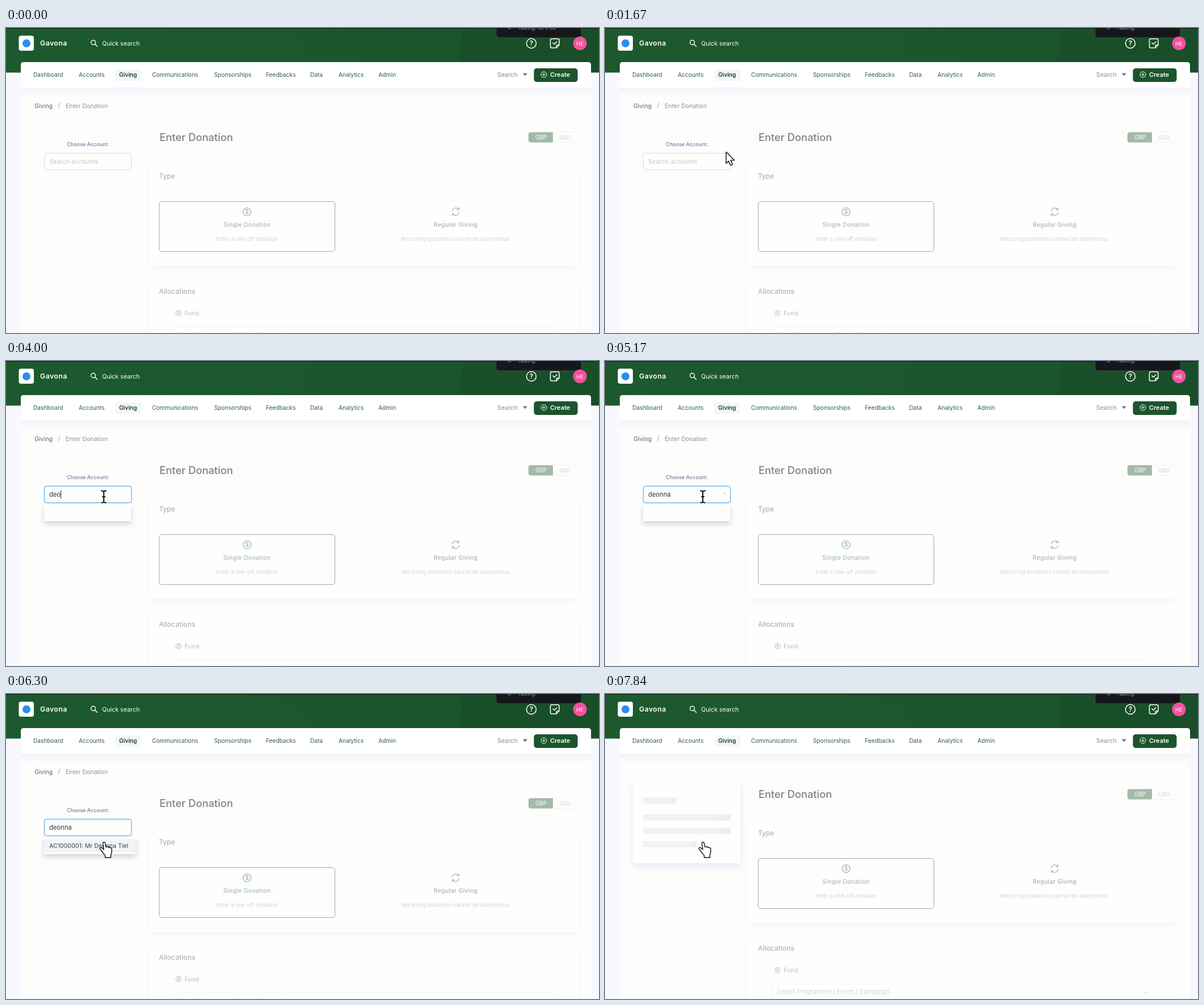
Write an HTML page that moves like this. It is 1043 by 537 pixels and loops after 8 s.

```html
<!DOCTYPE html>
<html lang="en">
<head>
<meta charset="utf-8">
<title>Enter Donation</title>
<style>
  html, body { margin: 0; width: 100%; height: 100%; overflow: hidden; background: #f9f8fe; }
  svg { display: block; width: 100%; height: 100%; }
  text { font-family: Inter, "Open Sans", sans-serif; white-space: pre; }
  .line { fill: none; stroke-linecap: round; stroke-linejoin: round; }
</style>
</head>
<body>
<svg id="stage" viewBox="0 0 1043 537" xmlns="http://www.w3.org/2000/svg"></svg>
<script>
const LOOP = 8000;
const QUERY = 'deonna';
const KEY_TIMES = [3440, 3770, 4000, 4300, 4500, 4640];
const LOADED = 5900, SELECTED = 6800;

const text = (x, y, size, fill, str, attrs = '') =>
  `<text x="${x}" y="${y}" font-size="${size}" fill="${fill}" ${attrs}>${str}</text>`;
const rect = (x, y, w, h, fill, r = 0, attrs = '') =>
  `<rect x="${x}" y="${y}" width="${w}" height="${h}" rx="${r}" fill="${fill}" ${attrs}/>`;
const outline = (x, y, w, h, stroke, r = 4, attrs = '') =>
  rect(x + .5, y + .5, w - 1, h - 1, 'none', r, `stroke="${stroke}" ${attrs}`);
const circle = (x, y, r, attrs) => `<circle cx="${x}" cy="${y}" r="${r}" ${attrs}/>`;
const line = (d, stroke, width = 1, attrs = '') =>
  `<path class="line" d="${d}" stroke="${stroke}" stroke-width="${width}" ${attrs}/>`;
const middle = 'text-anchor="middle"';
const spaced = `${middle} font-weight="500" letter-spacing=".4"`;

const coin = (x, y, r, color) =>
  circle(x, y, r, `fill="none" stroke="${color}" stroke-width="${r / 6}"`) +
  text(x, y + r * .52, r * 1.45, color, '$', middle);

const defs = `<defs>
  <linearGradient id="header"><stop stop-color="#1c5a2e"/><stop offset="1" stop-color="#1b532b"/></linearGradient>
  <linearGradient id="fade" x2="0" y2="1"><stop stop-color="#f3f3fa"/><stop offset="1" stop-color="#fdfefc"/></linearGradient>
  <linearGradient id="shimmer"><stop offset=".25" stop-color="#f2f2f1"/><stop offset=".37" stop-color="#e5e5e5"/><stop offset=".63" stop-color="#f2f2f1"/></linearGradient>
  <filter id="card" x="-20%" y="-20%" width="140%" height="150%"><feDropShadow dx="0" dy="7" stdDeviation="7" flood-color="#b0b0e0" flood-opacity=".28"/></filter>
  <filter id="soft" x="-5%" y="-20%" width="110%" height="150%"><feDropShadow dx="0" dy="4" stdDeviation="5" flood-color="#b0b0dd" flood-opacity=".12"/></filter>
  <filter id="popup" x="-20%" y="-60%" width="140%" height="250%"><feDropShadow dx="0" dy="5" stdDeviation="5" flood-color="#000" flood-opacity=".17"/></filter>
</defs>`;

const header =
  rect(0, 0, 1043, 78.5, 'url(#header)') +
  '<path d="M803 1Q802 45 789 78H1043V1z" fill="#000" opacity=".06"/>' +
  rect(0, 0, 1043, 1, '#0c1a10') +
  rect(22.5, 13.5, 26.5, 26.5, '#fff', 4) + circle(36, 27, 7, 'fill="#2b8df0"') +
  text(60, 31, 12.2, '#fff', 'Gavona', 'font-weight="600" letter-spacing=".5"') +
  circle(153.5, 25.5, 4, 'fill="none" stroke="#fff" stroke-width="1.4"') + line('M156.5 28.5l4 4', '#fff', 1.5) +
  text(169, 30.5, 10.7, '#fff', 'Quick search') +
  rect(862, -8, 150, 25, '#15171a', 5, 'stroke="#3d4a42"') +
  line('M883 0q2.5 4 5 0', '#aaa') +
  text(900, 2.5, 9, '#8c8f92', 'Talking:<tspan id="speaker"> Jo\'s Oz</tspan>') +
  circle(924, 27, 8.5, 'fill="none" stroke="#fff" stroke-width="1.5"') +
  text(924, 31.3, 12, '#fff', '?', `${middle} font-weight="600"`) +
  line('M968 35h-8q-2.5 0-2.5-2.5v-11q0-2.5 2.5-2.5h10.5q2.5 0 2.5 2.5v8.5zv-3q0-2 2-2h3', '#fff', 1.5) +
  line('M962 26l2.5 2.5 4.5-4.5', '#fff', 1.5) +
  circle(1009.5, 27, 12, 'fill="#f3529f"') + text(1009.3, 30.5, 9.3, '#fff', 'HE', middle);

const menu = [[48, 'Dashboard'], [128, 'Accounts'], [257, 'Communications'], [366, 'Sponsorships'],
  [457, 'Feedbacks'], [535, 'Data'], [585, 'Analytics'], [655, 'Admin']];

const nav =
  rect(26, 60, 1003, 490, '#fdfefc', 5) + rect(26, 105, 1003, 20, 'url(#fade)') +
  rect(26, 60, 1003, 45, '#fff', 5) + rect(192, 73, 46, 20, '#f5f5fa', 4) +
  menu.map(([x, label]) => text(x, 86.3, 10.2, '#2f5f3f', label)).join('') +
  text(199, 86.3, 10.1, '#174626', 'Giving', 'font-weight="600"') +
  text(864, 86.3, 10.8, '#8a8c90', 'Search') + '<path d="M909 79.5h8l-4 5z" fill="#777"/>' +
  rect(928.5, 71, 77, 24, '#1b552c', 5) +
  circle(946, 82, 5, 'fill="none" stroke="#fff"') + line('M943.5 82h5M946 79.5v5', '#fff') +
  text(957, 86.3, 10.9, '#fff', 'Create', 'font-weight="600"');

const form =
  rect(251, 168, 349, 48, '#fcfcfa') +
  text(270, 198.5, 18.3, '#828282', 'Enter Donation', 'font-weight="500"') +
  outline(918, 183, 88, 19, '#f1f4f1', 4) +
  '<path d="M962 183.5v18h-39q-4 0-4-4v-10q0-4 4-4z" fill="#a3baa9"/>' +
  text(941, 195.5, 9.8, '#fff', 'GBP', middle) + text(983.5, 195.5, 9.4, '#ccd2cd', 'USD', middle) +
  rect(251, 240, 755, 179, '#fefefd', 5, 'filter="url(#soft)"') +
  text(269, 264.5, 12.1, '#a6a8a6', 'Type') +
  outline(269, 305, 310, 89, '#9aada5', 4.5) + outline(594, 305, 394, 89, '#fafbf9', 4.5) +
  coin(424, 323.5, 7, '#93ae9f') +
  line('M784.8 322.5a6.3 6.3 0 0 1 11.5-2.8M796.8 324.5a6.3 6.3 0 0 1-11.5 2.8M796.8 316.5v3.5h-3.5M784.8 330.5v-3.5h3.5', '#a5a5a5', 1.1) +
  text(424, 350, 10.3, '#a3bcac', 'Single Donation', spaced) +
  text(791, 350, 10.3, '#adafad', 'Regular Giving', spaced) +
  text(424, 374.8, 9.35, '#d0d4d1', 'Enter a one-off donation', middle) +
  text(790.5, 374.8, 9.4, '#d0d4d1', 'Recurring donations cannot be anonymous', middle) +
  rect(251, 443, 755, 140, '#fefefd', 5, 'filter="url(#soft)"') +
  text(269, 467.8, 12.3, '#a6a8a6', 'Allocations') +
  outline(269, 501, 719, 90, '#f8f9f7') + rect(293, 494, 54, 16, '#fefefd') +
  coin(303.5, 502, 4.7, '#93ae9f') + text(314, 505.7, 10.9, '#bdc0bd', 'Fund') +
  outline(293, 526, 670, 32, '#f3f5f2', 3) +
  text(302, 544.3, 11, '#d2d6d2', 'Select Programme / Event / Campaign') +
  line('M948 540.5l3 3 3-3', '#c5cac5');

const picker =
  text(50, 140.5, 10.7, '#53695a', 'Giving') + line('M92 141l3-9', '#999', .9) +
  text(105, 140.5, 10.6, '#899398', 'Enter Donation') +
  text(107, 208, 9.1, '#5a668f', 'Choose Account:') +
  rect(65.5, 218.5, 157, 33, '#e1f1fe', 6, 'id="glow"') +
  rect(67.5, 220.5, 153, 29, '#fefefd', 4, 'stroke="#d9dbd9"') +
  outline(67, 220, 154, 30, '#51aefa', 4, 'id="hover"') +
  text(76, 238.5, 10.86, '#c3c5c3', 'Search accounts', 'id="hint"') +
  text(76, 238.8, 11.2, '#333', '', 'id="typed"') +
  rect(76, 228, 1, 14, '#222', 0, 'id="caret"') +
  line('M208 232a4 4 0 0 1 4.5 4', '#b9bcc0', .9, 'id="spinner"') +
  `<g id="dropdown">${rect(67, 252, 175, 30, '#fefefd', 2, 'id="popup-box" filter="url(#popup)"')}
    ${rect(67, 255, 175, 24, '#f4f4f4', 0, 'id="popup-item"')}
    ${text(76, 270.5, 10.6, '#404040', '', 'id="popup-text"')}</g>`;

const skeleton =
  rect(49, 152, 189, 146, '#fefefe', 3, 'filter="url(#card)"') +
  [[182, 58], [212, 154], [235.5, 154], [259, 94]].map(([y, w]) =>
    rect(67, y, w, 11, 'url(#shimmer)', 2)).join('');

const status =
  rect(-4, 528, 343, 14, '#e0c2be', 3) + text(0, 538.8, 8.8, '#5c4242', 'ing for n3o.cloud...');

const inked = 'fill="#fff" stroke="#111" stroke-width="1.4" stroke-linejoin="round"';
const beam = 'M-4-10.5q4 0 4 2.5 0-2.5 4-2.5M0-8v16M-4 10.5q4 0 4-2.5 0 2.5 4 2.5M-2 0h4';
const cursors =
  `<path id="arrow" ${inked} d="M0 0V20l4.5-4 3.5 7.5 3.5-1.5-3.5-7.5h6.5z"/>
   <g id="beam">${line(beam, '#fff', 4)}${line(beam, '#111', 2)}</g>
   <path id="hand" ${inked} d="M-1.5 2.5C-2-.8 2-1.2 2.5 1.8L4 8.5c1-1.3 3.2-1 3.6.5 1.2-1 2.9-.6 3.3.8 1.4-.6 2.9.2 3.1 1.8.6 4.5-.2 7.4-1.5 10.7V27H2.500v-3.500C1.500 21.500-.5 20.500-1.500 18.500L-6.500 12c-1.300-2.600 1.800-3.700 3.300-1.900L0 13z"/>`;

const stage = document.getElementById('stage');
stage.innerHTML = defs + header + nav +
  `<g id="form">${form}</g><g id="picker">${picker}</g><g id="skeleton">${skeleton}</g>
   <g id="status">${status}</g><g id="cursor">${cursors}</g>`;

const el = id => document.getElementById(id);
const set = (id, name, value) => el(id).setAttribute(name, value);
const show = (id, visible) => { el(id).style.display = visible ? '' : 'none'; };
const ramp = (t, start, length) => Math.min(1, Math.max(0, (t - start) / length));
const easeOut = (p, power) => 1 - (1 - p) ** power;
const within = (t, a, b) => t >= a && t < b;

function drawCursor(t) {
  const p = ramp(t, 1370, 600);
  const x = 262 - 90 * p ** .88;
  const y = 14 + 225 * easeOut(p, 3.43) + 22 * ramp(t, 6240, 60);
  const overInput = x < 221 && y > 220 && y < 250;
  show('cursor', t >= 1370);
  set('cursor', 'transform', `translate(${x} ${y})`);
  show('beam', overInput);
  show('hand', y >= 250);
  show('arrow', !overInput && y < 250);
}

function drawPicker(t) {
  const typed = QUERY.slice(0, KEY_TIMES.filter(k => t >= k).length);
  set('hover', 'opacity', ramp(t, 1700, 250));
  set('glow', 'opacity', ramp(t, 2200, 250));
  show('hint', !typed);
  el('typed').textContent = typed;
  show('caret', within(t, 2200, 2700) || within(t, 3240, 5170) || within(t, 5700, 6240));
  set('caret', 'x', 76 + (typed ? el('typed').getComputedTextLength() : 0));
  show('spinner', within(t, 5170, LOADED));
  set('spinner', 'transform', `rotate(${(t - 5170) * .36} 208.5 236)`);

  const open = easeOut(ramp(t, 2200, 280), 3);
  const loaded = t >= LOADED;
  const label = loaded ? 'AC1000001: Mr Deonna Tiel' : typed ? '' : 'Make an anonymous donation';
  const width = loaded ? 161 : typed ? 153 : 175;
  show('dropdown', t >= 2200);
  set('dropdown', 'opacity', open);
  set('dropdown', 'transform', `translate(0 ${252 * .2 * (1 - open)}) scale(1 ${.8 + .2 * open})`);
  set('popup-box', 'width', width);
  set('popup-item', 'width', width);
  show('popup-item', label);
  el('popup-text').textContent = label;
}

function draw(t) {
  const selected = t >= SELECTED;
  show('speaker', t < 500);
  show('picker', !selected);
  show('skeleton', selected);
  set('form', 'transform', `translate(0 ${selected ? -16 : 0})`);
  show('status', selected);
  set('status', 'opacity', 1 - ramp(t, 7090, 120));
  const shift = -3 + 3 * easeOut(ramp(t, SELECTED, 1400), 2);
  set('shimmer', 'x1', shift);
  set('shimmer', 'x2', shift + 4);
  if (!selected) drawPicker(t);
  drawCursor(t);
}

const start = performance.now();
function tick() {
  draw((performance.now() - start) % LOOP);
  requestAnimationFrame(tick);
}
tick();
</script>
</body>
</html>
```
